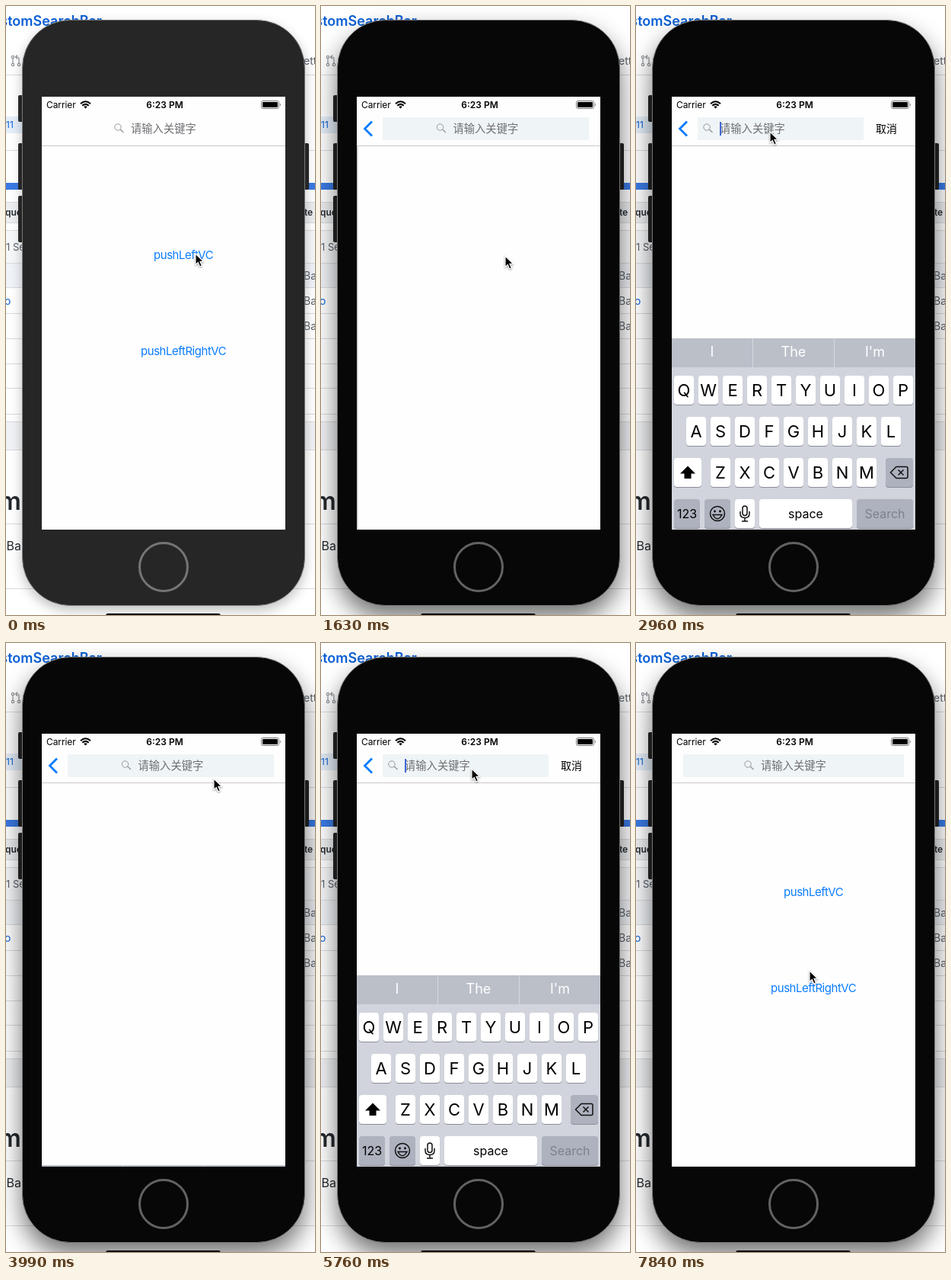
These frames come from a looping animation (406x799 px, 7990 ms). An HTML page:

```html
<!DOCTYPE html>
<html lang="en">
<head>
<meta charset="utf-8">
<title>Search bar demo</title>
<style>
html, body { margin: 0; width: 100%; height: 100%; overflow: hidden; background: #fff; }
svg { display: block; width: 406px; height: 799px; font-family: Inter, "Noto Sans", sans-serif; }
.cjk { font: 14.3px "Noto Sans CJK SC", "Noto Sans CJK", sans-serif; }
.link { font-size: 15px; letter-spacing: -.45px; fill: #0a7cff; }
.mid { text-anchor: middle; }
</style>
</head>
<body>
<svg viewBox="0 0 406 799">
  <defs>
    <clipPath id="screenClip"><path d="M47 119H367V687H47z"/></clipPath>
    <filter id="soft" x="-30%" y="-20%" width="160%" height="140%"><feGaussianBlur stdDeviation="8"/></filter>
    <filter id="deep" x="-30%" y="-20%" width="160%" height="140%"><feGaussianBlur stdDeviation="16"/></filter>
    <linearGradient id="edge"><stop stop-opacity="0"/><stop offset="1" stop-opacity=".16"/></linearGradient>
  </defs>

  <!-- web page behind the phone -->
  <g id="page">
    <path fill="#fff" d="M0 0H406V799H0z"/>
    <path fill="#e4eef9" d="M0 145H21V167H0z"/>
    <path fill="#3b7ae4" d="M0 232H406V241H0z"/>
    <path fill="#eceef0" d="M0 258H406V285H0z"/>
    <path fill="#f6f7f9" d="M0 295H406V338H0z"/>
    <path fill="#f0f3f7" d="M0 338H406V370H0z"/>
    <path fill="#f1f2f5" d="M0 546H406V583H0z"/>
    <path id="rules" stroke="#d8dadd"/>
    <text x="126" y="26" text-anchor="end" font-size="18" font-weight="600" fill="#0b60d6">CustomSearchBar</text>
    <g fill="none" stroke="#8d9196" stroke-width="1.2">
      <circle cx="9" cy="67" r="1.7"/><circle cx="9" cy="77" r="1.7"/><circle cx="17" cy="77" r="1.7"/>
      <path d="M9 69V75M17 75V69Q17 67 15 67H13M15 64.5L12.5 67L15 69.500"/>
    </g>
    <g font-size="14" fill="#586069">
      <text x="382" y="77">Settings</text>
      <text x="0" y="321" font-size="13">1 Search</text>
      <text x="391" y="359">Bar</text><text x="391" y="392">Bar</text><text x="391" y="425">Bar</text>
    </g>
    <g font-size="12" font-weight="600" fill="#24292e">
      <text x="-1" y="275">quest</text><text x="392" y="275">te</text>
    </g>
    <g fill="#0b60d6"><text x="0" y="160" font-size="12">11</text><text x="-2" y="392" font-size="14">o</text></g>
    <g fill="#24292e">
      <text x="-9" y="661" font-size="32" font-weight="600">mSearch</text>
      <text x="-9" y="714" font-size="16">hBar</text>
    </g>
  </g>

  <!-- phone -->
  <rect id="shadow" x="21" y="18" width="372" height="769" rx="64"/>
  <g id="buttons">
    <rect x="16" y="117" width="9" height="35" rx="2"/><rect x="16" y="180" width="9" height="61" rx="2"/>
    <rect x="16" y="249" width="9" height="61" rx="2"/><rect x="389" y="180" width="9" height="61" rx="2"/>
  </g>
  <rect id="body" x="21.500" y="18.500" width="371" height="768" rx="63" stroke="#777"/>
  <circle id="home" cx="207" cy="736" r="31.500" fill="none" stroke-width="3"/>
  <rect x="131" y="797" width="151" height="8" rx="3"/>

  <!-- screen -->
  <g clip-path="url(#screenClip)">
    <path fill="#fefefe" d="M47 119H367V687H47z"/>
    <g id="menu">
      <text class="link" x="194" y="332">pushLeftVC</text>
      <text class="link" x="177" y="458">pushLeftRightVC</text>
    </g>
    <path id="dim" d="M47 184H367V687H47z"/>
    <g id="detail">
      <path fill="url(#edge)" d="M39 184H47V687H39z"/>
      <path fill="#fefefe" d="M47 184H367V687H47z"/>
    </g>

    <path fill="#fefefe" d="M47 119H367V184H47z"/>
    <path stroke="#c9c9cb" d="M47 183.500H367"/>
    <text x="53" y="133.500" font-size="12" letter-spacing="-.1">Carrier</text>
    <text class="mid" x="208.500" y="133.500" font-size="12" font-weight="600">6:23 PM</text>
    <g fill="none" stroke="#000" stroke-width="2">
      <path d="M98 128.300Q104.500 122.300 111 128.300M100.300 130.800Q104.500 127 108.700 130.800"/>
    </g>
    <path d="M102.300 132.300Q104.500 130.300 106.700 132.300L104.500 134.600z"/>
    <rect x="335.500" y="124.500" width="23" height="10" rx="2.200" fill="none" stroke="#777"/>
    <rect x="337" y="126" width="20" height="7" rx="1"/>
    <path fill="#777" d="M360 127.500Q362 129.500 360 131.500z"/>

    <path id="back" d="M67 151.500L57.500 161L67 170.500" fill="none" stroke="#0a7cff" stroke-width="2.800"/>
    <rect id="field" y="146" height="30" rx="1.500" fill="#eff4f6"/>
    <g id="hint">
      <circle cx="-17" cy="159" r="4.200" fill="none" stroke="#97999c"/>
      <path d="M-13.800 162L-9.500 166" stroke="#97999c" stroke-width="1.400"/>
      <text class="cjk" y="166" fill="#6e6f73">请输入关键字</text>
    </g>
    <path id="caret" d="M110 152H112V170H110z" fill="#4269d9"/>
    <text id="cancel" class="cjk" x="315" y="166" style="font-size:14px">取消</text>

    <g id="keyboard">
      <path fill="#d1d4dc" d="M47 436H367V687H47z"/>
      <path fill="#bbbfc8" d="M47 436H367V474H47z"/>
      <path stroke="#d5d8de" d="M153.500 436V474M260.500 436V474"/>
      <g class="mid" font-size="18" fill="#fff">
        <text x="100" y="460">I</text><text x="207" y="460">The</text><text x="314" y="460">I'm</text>
      </g>
      <g id="keys"></g>
      <path d="M68 603.500L78 613.500H72.500V620H63.500V613.500H58z"/>
      <g fill="none" stroke="#111" stroke-width="1.500">
        <path d="M334.500 612L342 604.500H355Q357 604.500 357 606.500V617.500Q357 619.500 355 619.500H342zM344.500 608.500L351.500 615.500M351.500 608.500L344.500 615.500"/>
        <circle cx="107" cy="666" r="9.500"/>
        <path d="M101 667.500Q107 678 113 667.500z"/>
        <rect x="140" y="656" width="6" height="12.500" rx="3"/>
        <path d="M137 663V666Q137 671.500 143 671.500Q149 671.500 149 666V663M143 671.500V676M139 676H147"/>
      </g>
      <circle cx="103.500" cy="663" r="1.400"/><circle cx="110.500" cy="663" r="1.400"/>
    </g>
    
  </g>
  <path id="pointer" d="M0 0V14.500L3.300 11.400L5.700 17L8.400 15.800L6 10.400H10.600z"
        stroke="#fff" stroke-width="1.200" style="filter:drop-shadow(0 1px 1px #0006)"/>
</svg>
<script>
const $ = id => document.getElementById(id);
const set = (id, attrs) => { for (const k in attrs) $(id).setAttribute(k, attrs[k]); };

const ruleYs = [91, 190, 258, 285, 295, 338, 370, 404, 437, 470, 502, 536, 546, 583, 680, 765];
set('rules', { d: ruleYs.map(y => `M0 ${y - .5}H406`).join('') });

// Keyboard keys
const LIGHT = '#fff', GREY = '#adb2be';
function key(x, y, w, label = '', fill = LIGHT, size = 22, color = '#000') {
  const box = (dy, c) => `<rect x="${x}" y="${y + dy}" width="${w}" height="38" rx="4" fill="${c}"/>`;
  return box(1, '#8b8e96') + box(0, fill) +
    `<text class="mid" x="${x + w / 2}" y="${y + 19 + size * .365}" font-size="${size}" fill="${color}">${label}</text>`;
}
const row = (letters, x, y) => [...letters].map((c, i) => key(x + 32 * i, y, 26, c)).join('');
$('keys').innerHTML =
  row('QWERTYUIOP', 50, 485) + row('ASDFGHJKL', 66, 539) + row('ZXCVBNM', 98, 593) +
  key(50, 593, 36) + key(328, 593, 36, '', GREY) +
  key(50, 647, 34, '123', GREY, 16) + key(90, 647, 34, '', GREY) + key(130, 647, 26) +
  key(162, 647, 122, 'space', LIGHT, 16) + key(290, 647, 74, 'Search', GREY, 16, '#7c818c');

// Tracks: [step, ...values], linear between entries
const TICK = 148, LOOP = 7990;
const pointer = [[2, 249, 325], [8, 242, 328], [11, 242, 328], [15, 176, 165], [20, 176, 165],
  [23, 324, 163], [25, 324, 163], [27, 273, 178], [31, 205, 220], [32, 205, 220], [34, 198, 165],
  [38, 198, 165], [41, 208, 232], [43, 208, 232], [46, 60, 166], [48, 60, 166], [53, 228, 430]];
const push = [[7, 0], [8, .3], [9, .75], [10, .95], [11, .995], [12, 1],
  [47, 1], [48, .7], [49, .25], [50, .05], [51, .005], [52, 0]];
const focus = [[17, 0], [18, .98], [19, 1], [24, 1], [25, .5], [26, .05], [27, 0],
  [35, 0], [36, .98], [37, 1], [39, 1], [40, .5], [41, .05], [42, 0]];
const rise = [[17, 0], [18, 128], [19, 240], [20, 251], [24, 251], [25, 170], [26, 40], [27, 2], [28, 0],
  [35, 0], [36, 128], [37, 240], [38, 251], [39, 251], [40, 180], [41, 60], [42, 8.5], [43, 2], [44, 0]];

function at(track, n) {
  const i = track.findIndex(k => k[0] >= n);
  if (i < 0) return track[track.length - 1].slice(1);
  if (!i) return track[0].slice(1);
  const a = track[i - 1], b = track[i], u = (n - a[0]) / (b[0] - a[0]);
  return a.slice(1).map((v, j) => v + (b[j + 1] - v) * u);
}

function draw(ms) {
  const n = Math.floor((ms % LOOP + 10) / TICK);
  const active = n >= 2;
  const [x, y] = at(pointer, n), [p] = at(push, n), [f] = at(focus, n), [up] = at(rise, n);

  set('shadow', active
    ? { filter: 'url(#deep)', opacity: .55, transform: 'translate(0 16)' }
    : { filter: 'url(#soft)', opacity: .25, transform: 'translate(0 6)' });
  set('body', { fill: active ? '#070707' : '#262626' });
  set('buttons', { fill: active ? '#1c1c1c' : '#262626' });
  set('home', { stroke: active ? '#626262' : '#757575' });

  set('menu', { transform: `translate(${-96 * p} 0)` });
  set('dim', { opacity: .1 * p });
  set('detail', { transform: `translate(${320 * (1 - p)} 0)`, opacity: p > 0 ? 1 : 0 });
  set('back', { opacity: p });
  const left = 62 + 19 * p;
  set('field', { x: left, width: 352 - 53 * f - left, opacity: active ? 1 : 0 });
  set('hint', { transform: `translate(${164 + 9.5 * p - 63.5 * f} 0)` });
  set('caret', { opacity: f > .9 ? 1 : 0 });
  set('cancel', { opacity: f });
  set('keyboard', { transform: `translate(0 ${251 - up})` });
  set('pointer', { transform: `translate(${x} ${y})` });
}

function loop() {
  draw(performance.now());
  requestAnimationFrame(loop);
}
loop();
</script>
</body>
</html>
```
